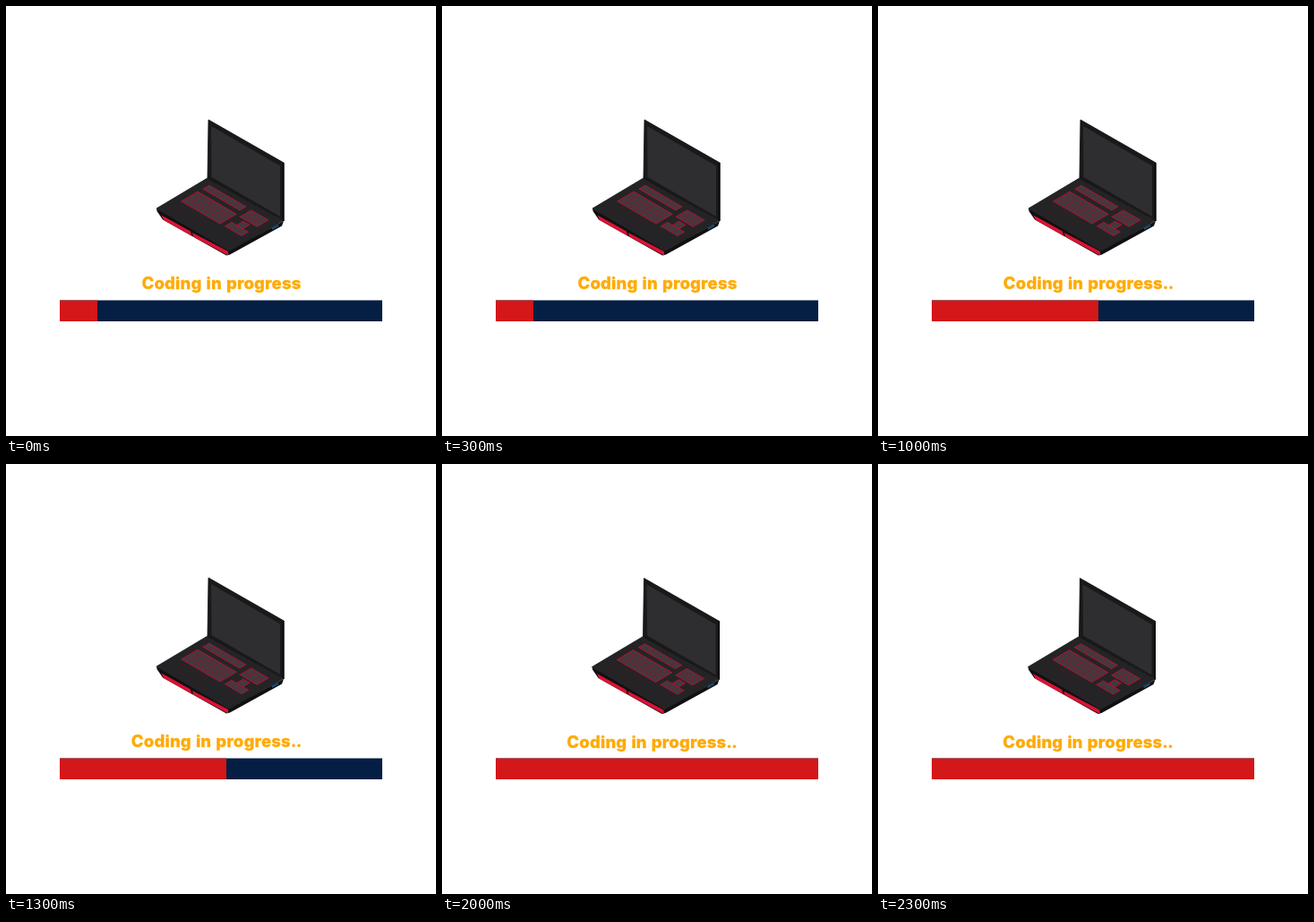
Write an HTML page that moves like this. It is 480x480 px and loops after 2500 ms.

```html
<!DOCTYPE html>
<html lang="en">
<head>
<meta charset="utf-8">
<title>Coding in progress</title>
<style>
  html, body { margin: 0; width: 100%; height: 100%; overflow: hidden; background: #fff; }
  svg { display: block; width: 100vw; height: 100vh; }
  text { font: 800 18.5px Inter, sans-serif; letter-spacing: .2px; word-spacing: .8px; }
  #dots { letter-spacing: -.7px; }
</style>
</head>
<body>
<svg viewBox="0 0 480 480">
  <g id="laptop">
    <!-- chassis sides -->
    <path d="M168 226L168.500 229L175 238.500L246 278.500L250 277.500L308 245.500L310 240L249 273Z" fill="#101012"/>
    <path d="M173.500 233.500L206 251.500L207 256.500L176 239ZM208 253L248 274V278.500L209 257.500Z" fill="#dc1234"/>
    <path d="M297 247L304 243V246L297 250Z" fill="#174a78"/>
    <path d="M168 226L225 192L309 240L249 274Z" fill="#242426" stroke="#161618" stroke-width=".8"/>
    <g id="deck" transform="matrix(.86 .5 .86 -.51 168 226)">
      <path d="M15 5V19H46V5M15 9H46" fill="none" stroke="#421a22" stroke-width=".7"/>
    </g>
    <!-- lid -->
    <path d="M226 127L310 175V240L225 192Z" fill="#19191b" stroke="#0b0b0c" stroke-width=".8" stroke-linejoin="round"/>
    <path d="M229 134L306 178.500V235L229.500 191Z" fill="#2e2e30"/>
    <path d="M309.700 175V240" stroke="#050505" stroke-width="1.600"/>
  </g>
  <text id="label" x="329.500" y="316" text-anchor="end" fill="#ffaa05" stroke="#ffaa05" stroke-width=".3" stroke-linejoin="round">Coding in progress<tspan id="dots"></tspan></text>
  <path d="M60 328.600H420V352H60Z" fill="#051e43"/>
  <rect id="bar" x="60" y="328.600" height="23.400" fill="#d41718"/>
</svg>
<script>
  const $ = id => document.getElementById(id);
  const laptop = $('laptop'), deck = $('deck'), label = $('label'), dots = $('dots'), bar = $('bar');

  function rect(x, y, width, height, fill, stroke = 'none') {
    const el = document.createElementNS('http://www.w3.org/2000/svg', 'rect');
    const attrs = { x, y, width, height, fill, stroke };
    for (const k in attrs) el.setAttribute(k, attrs[k]);
    deck.append(el);
  }

  // A block of grey keys on a red backlight
  function keys(x, y, w, h, cols, rows) {
    rect(x, y, w, h, '#85192f', '#b8122f');
    const cw = (w - .4) / cols, ch = (h - .4) / rows;
    for (let r = 0; r < rows; r++)
      for (let c = 0; c < cols; c++)
        rect(x + .6 + c * cw, y + .6 + r * ch, cw - .8, ch - .8, '#3f3b40');
  }

  keys(8.5, 24, 50, 21, 7, 4);
  keys(9, 51.5, 47.5, 8, 7, 1);
  keys(64, 44.5, 22, 14.5, 3, 3);
  keys(64.5, 24.5, 21.5, 8.5, 3, 1);
  keys(71, 33, 8, 8.5, 1, 1);

  // Per step: tilt in degrees, dot count, bar width, nudge
  const STEP = 500;
  const steps = [
    [0, 0, 42, 0],
    [-18, 1, 112, 0],
    [0, 2, 186, 0],
    [18, 3, 269.5, 0],
    [0, 2, 360, .5]
  ];
  let shown = -1;

  function draw() {
    const i = Math.floor(performance.now() / STEP) % steps.length;
    if (i !== shown) {
      const [tilt, count, width, nudge] = steps[shown = i];
      const shift = `translate(${-nudge} ${nudge})`;
      laptop.setAttribute('transform', `${shift} rotate(${tilt} 239.5 203)`);
      label.setAttribute('transform', shift);
      dots.textContent = '.'.repeat(count);
      bar.setAttribute('width', width);
    }
    requestAnimationFrame(draw);
  }
  draw();
</script>
</body>
</html>
```
